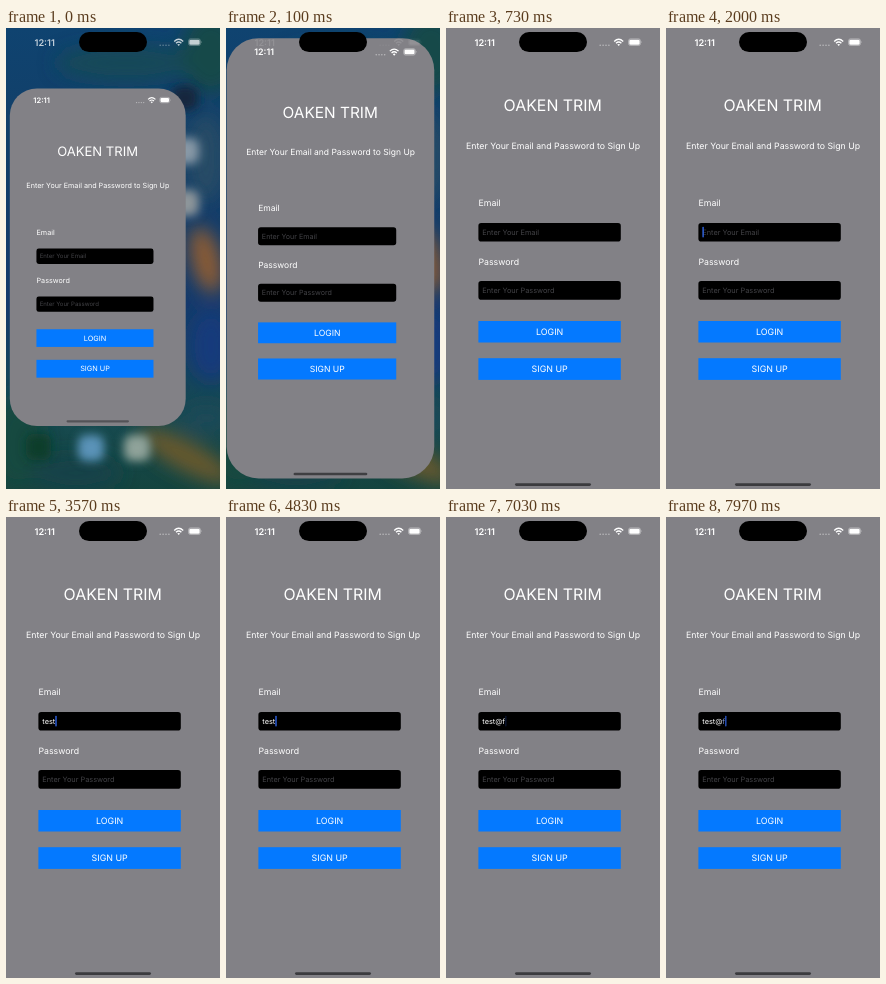
An HTML page that plays this animation: 214 by 461 pixels, repeating every 8000 ms.

```html
<!DOCTYPE html>
<html lang="en">
<head>
<meta charset="utf-8">
<title>Sign up</title>
<style>
html, body { margin: 0; width: 100%; height: 100%; overflow: hidden; background: #828186; }
svg { display: block; width: 214px; height: 461px; }
text { font-family: Inter, "Liberation Sans", sans-serif; fill: #fff; text-rendering: geometricPrecision; white-space: pre; }
.mid { text-anchor: middle; }
.title { font-size: 15.9px; }
.body { font-size: 8.75px; }
.btn { font-size: 8.9px; }
.input { font-size: 7.35px; }
.hint { fill: #424246; }
.time { font-size: 9.2px; font-weight: 600; }
</style>
</head>
<body>
<svg viewBox="0 0 214 461">
  <defs>
    <linearGradient id="sky" x1="0" y1="0" x2="0" y2="1">
      <stop offset="0" stop-color="#0f4370"/>
      <stop offset=".25" stop-color="#123f68"/>
      <stop offset=".6" stop-color="#143a6c"/>
      <stop offset=".85" stop-color="#174a50"/>
      <stop offset="1" stop-color="#14443f"/>
    </linearGradient>
    <filter id="soft" x="-100%" y="-100%" width="300%" height="300%"><feGaussianBlur stdDeviation="9"/></filter>
    <filter id="mist" x="-100%" y="-100%" width="300%" height="300%"><feGaussianBlur stdDeviation="5"/></filter>
    <clipPath id="clip"><rect id="mask"/></clipPath>
    <g id="status">
      <text class="time" x="28.5" y="17.5">12:11</text>
      <g fill="#fff" opacity=".45">
        <circle cx="154.2" cy="17.2" r=".8"/><circle cx="157.1" cy="17.2" r=".8"/>
        <circle cx="160" cy="17.2" r=".8"/><circle cx="162.9" cy="17.2" r=".8"/>
      </g>
      <g fill="none" stroke="#fff" stroke-width="1.4">
        <path d="M168.2 13.4Q172.7 9.2 177.2 13.4"/>
        <path d="M170 15.3Q172.7 12.9 175.4 15.3"/>
      </g>
      <path d="M171.3 16.5Q172.7 15.4 174.1 16.5L172.7 18.1Z" fill="#fff"/>
      <rect x="182.5" y="10.9" width="12" height="6.6" rx="2" fill="none" stroke="#fff" stroke-width=".6" opacity=".6"/>
      <rect x="183.3" y="11.7" width="10.4" height="5" rx="1.3" fill="#fff"/>
      <path d="M195.4 13.1q1 1.1 0 2.2z" fill="#fff" opacity=".6"/>
    </g>
  </defs>

  <g id="home">
    <rect width="214" height="461" fill="url(#sky)"/>
    <g filter="url(#soft)">
      <ellipse cx="120" cy="35" rx="70" ry="18" fill="#154a58"/>
      <ellipse cx="205" cy="25" rx="30" ry="40" fill="#17484a"/>
      <ellipse cx="200" cy="130" rx="20" ry="45" fill="#254c66"/>
      <ellipse cx="200" cy="232" rx="15" ry="34" fill="#8a5c36" transform="rotate(-14 200 232)"/>
      <ellipse cx="205" cy="318" rx="22" ry="36" fill="#123a7c"/>
      <ellipse cx="12" cy="415" rx="26" ry="45" fill="#14483f"/>
      <ellipse cx="70" cy="445" rx="45" ry="18" fill="#144348"/>
      <ellipse cx="180" cy="428" rx="52" ry="15" fill="#66592f" transform="rotate(28 180 428)"/>
      <ellipse cx="200" cy="390" rx="24" ry="14" fill="#1b4a58"/>
    </g>
    <g filter="url(#mist)">
      <rect x="168" y="110" width="25" height="26" rx="8" fill="#8798a6"/>
      <rect x="168" y="162" width="25" height="26" rx="8" fill="#8d959a"/>
      <rect x="166" y="58" width="26" height="24" rx="8" fill="#15263c"/>
      <rect x="20" y="406" width="25" height="26" rx="8" fill="#103d2c"/>
      <rect x="72" y="407" width="26" height="26" rx="8" fill="#5a93b8"/>
      <rect x="118" y="407" width="26" height="26" rx="8" fill="#8fa39a"/>
    </g>
  </g>

  <g clip-path="url(#clip)">
    <rect width="214" height="461" fill="#828186"/>
    <g id="page">
      <use href="#status"/>
      <text class="title mid" x="106.8" y="82.6">OAKEN TRIM</text>
      <text class="body mid" x="107.1" y="120.7">Enter Your Email and Password to Sign Up</text>
      <text class="body" x="32.5" y="178.4">Email</text>
      <text class="body" x="32.5" y="236.6">Password</text>
      <rect x="32.4" y="194.9" width="142.4" height="18.6" rx="2.8"/>
      <rect x="32.4" y="253.1" width="142.4" height="18.6" rx="2.8"/>
      <text id="hint" class="input hint" x="36.3" y="206.9">Enter Your Email</text>
      <text class="input hint" x="36.3" y="265.1">Enter Your Password</text>
      <text class="input" x="36.3" y="206.9"><tspan id="typed"></tspan><tspan id="tail"></tspan></text>
      <rect id="caret" y="198.8" width="1.4" height="10.6" rx=".6" fill="#2f64e6"/>
      <rect x="32.4" y="293" width="142.4" height="21.5" fill="#0479ff"/>
      <rect x="32.4" y="330.2" width="142.4" height="21.7" fill="#0479ff"/>
      <text class="btn mid" x="103.7" y="307">LOGIN</text>
      <text class="btn mid" x="103.7" y="344.4">SIGN UP</text>
    </g>
    <rect id="bar" fill="#3b3b3e"/>
  </g>

  <use id="ghost" href="#status"/>
  <rect x="73" y="4" width="68" height="20.1" rx="10.05"/>
</svg>
<script>
const LOOP = 8000, STEP = 100 / 3, FOCUS = 1030, SETTLED = 730;
// Moment at which each letter is typed
const KEYS = [[2760, "t"], [2960, "e"], [3160, "s"], [3400, "t"], [5600, "@"], [6500, "f"]];
const $ = id => document.getElementById(id);
const clamp = v => Math.max(0, Math.min(1, v));
const set = (id, attrs) => {
  for (const k in attrs) $(id).setAttribute(k, attrs[k]);
};

function openCard(t) {
  const moving = t < SETTLED;
  const away = moving ? Math.exp(-t / 56) : 0;
  const s = 1 - 0.178 * away, x = 3.8 * away, y = 60.4 * away;
  const bottom = 461 - 63 * away;
  const thick = 2.8 - 0.6 * away;
  set("mask", { x, y, width: 214 * s, height: bottom - y, rx: moving ? 33 * s : 0 });
  set("page", { transform: `translate(${x} ${y}) scale(${s})` });
  set("bar", {
    x: x + 69 * s, y: bottom - 5.8, width: 76 * s, height: thick, rx: thick / 2,
    opacity: 1 - 0.35 * away
  });
  set("ghost", { opacity: 0.75 * away });
  set("home", { visibility: moving ? "visible" : "hidden" });
}

// Solid, fade out, pause, fade in; restarts with every key
function blink(age) {
  const p = (age / 1000) % 1;
  return p < 0.7 ? 1 - clamp((p - 0.45) / 0.1) * 0.95 : 0.05 + 0.95 * clamp((p - 0.87) / 0.08);
}

function typeEmail(t) {
  const done = KEYS.filter(k => k[0] <= t);
  const word = done.map(k => k[1]).join("");
  $("typed").textContent = word.slice(0, 5);
  $("tail").textContent = word.slice(5);
  const dim = clamp((t - 7700) / 250);
  $("tail").style.fill = `rgb(${255 - 120 * dim},${255 - 100 * dim},${255 - 45 * dim})`;
  set("hint", { visibility: word ? "hidden" : "visible" });
  const last = done.length ? done[done.length - 1][0] : FOCUS;
  const width = $("typed").getComputedTextLength() + $("tail").getComputedTextLength();
  set("caret", { x: 36.4 + width, opacity: t < FOCUS ? 0 : blink(t - last) });
}

function draw(ms) {
  const t = Math.floor((ms % LOOP + 3.4) / STEP) * STEP;
  openCard(t);
  typeEmail(t);
}

let start = null;
function tick(now) {
  if (start === null) start = now;
  draw(Math.max(0, now - start));
  requestAnimationFrame(tick);
}
draw(0);
requestAnimationFrame(tick);
</script>
</body>
</html>
```
